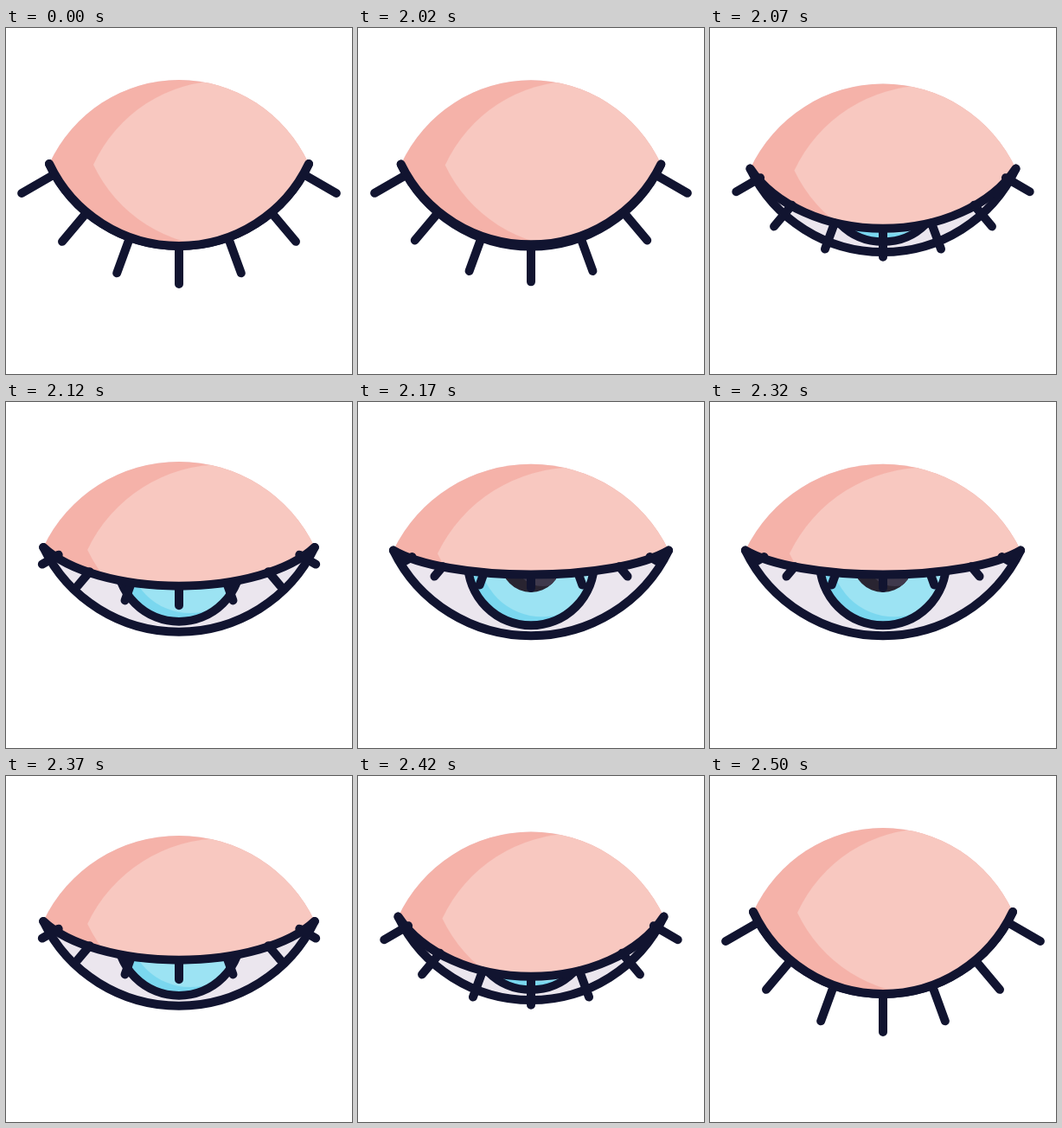
These frames come from a looping animation (400x400 px, 2.52 s). An HTML page:

```html
<!DOCTYPE html>
<html lang="en">
<head>
<meta charset="utf-8">
<title>Blinking eye</title>
<style>
  html, body { margin: 0; width: 100%; height: 100%; overflow: hidden; background: #fff; }
  svg { display: block; width: 100%; height: 100%; }
  .line { fill: none; stroke: #111430; stroke-width: 10; stroke-linecap: round; stroke-linejoin: round; }
</style>
</head>
<body>
<svg viewBox="0 0 400 400">
  <clipPath id="skinClip"><path id="skinEdge"/></clipPath>
  <path id="ball" fill="#ebe6ee"/>
  <g id="iris">
    <clipPath id="irisClip"><circle r="73.5"/></clipPath>
    <clipPath id="pupilClip"><circle r="35"/></clipPath>
    <circle r="73.5" fill="#7ad7ef"/>
    <circle cx="13" cy="-10" r="73.5" fill="#9ce3f3" clip-path="url(#irisClip)"/>
    <circle r="35" fill="#292431"/>
    <circle cx="14" cy="-7" r="35" fill="#3f394c" clip-path="url(#pupilClip)"/>
    <circle class="line" r="73.5"/>
  </g>
  <path id="lower" class="line"/>
  <path id="skin" fill="#f5b2a9"/>
  <g clip-path="url(#skinClip)"><path id="glow" fill="#f8c8c0"/></g>
  <path id="lashes" class="line"/>
  <path id="upper" class="line"/>
</svg>
<script>
const LOOP = 2520, PEAK = 2245, HALF = 230, STEP = 25, CX = 200;

const $ = id => document.getElementById(id);
const draw = (id, d) => $(id).setAttribute('d', d);
const place = (id, move) => $(id).setAttribute('transform', move);
const bez = (s, a, b) => 3 * s * (1 - s) ** 2 * a + 3 * s * s * (1 - s) * b + s ** 3;

// cubic-bezier(.42, .56, .53, 1)
function ease(u) {
  let lo = 0, hi = 1;
  for (let i = 0; i < 24; i++) {
    const s = (lo + hi) / 2;
    if (bez(s, 0.42, 0.53) < u) lo = s; else hi = s;
  }
  return bez(lo, 0.56, 1);
}

function openness(t) {
  const held = Math.floor((t + 5) / STEP) * STEP - 5;
  const u = 1 - Math.abs(held - PEAK) / HALF;
  return u > 0 ? 1.01 * ease(u) : 0;
}

// Every lid curve is the same arc, stretched to half width w and depth
const arc = (w, depth, sweep, x, y) =>
  `A${w * 1.106} ${depth * 1.746} 0 0 ${sweep} ${x} ${y}`;

// Lashes fan out 20 degrees apart, their tips on an ellipse
function fan(mix) {
  const rx = mix(210, 170), ry = mix(210, 42), cy = mix(86, 165), len = mix(43, 12);
  let d = '';
  for (let k = -3; k <= 3; k++) {
    const a = k * Math.PI / 9, sin = Math.sin(a), cos = Math.cos(a);
    d += `M${CX + rx * sin} ${cy + ry * cos}l${-len * sin} ${-len * cos}`;
  }
  return d;
}

function render(p) {
  const mix = (shut, open) => shut + (open - shut) * p;
  const w = mix(150, 160), y = mix(157, 173);
  const left = CX - w, right = CX + w;
  const lid = mix(95, 21.5), low = mix(95, 99);

  const start = `M${left} ${y}`;
  const dome = start + arc(w, mix(97, 100), 1, right, y);
  const almond = dome + arc(w, low, 1, left, y) + 'Z';
  const skin = dome + arc(w, lid, 1, left, y) + 'Z';

  draw('ball', almond);
  draw('glow', almond);
  draw('skin', skin);
  draw('skinEdge', skin);
  draw('lower', start + arc(w, low, 0, right, y));
  draw('upper', start + arc(w, lid, 0, right, y));
  draw('lashes', fan(mix));
  place('glow', `translate(51 ${mix(1, 4)})`);
  place('iris', `translate(${CX} ${mix(172, 186.5)}) scale(${mix(0.93, 1)})`);
}

function tick(now) {
  render(openness(now % LOOP));
  requestAnimationFrame(tick);
}
render(0);
requestAnimationFrame(tick);
</script>
</body>
</html>
```
